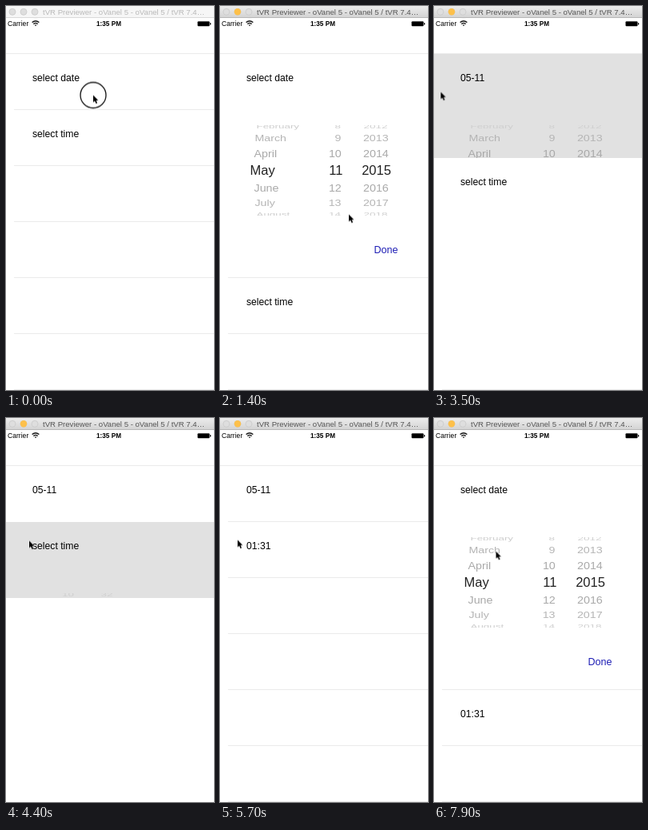
Recreate the animation shown at these times as an HTML page. Size 260 px wide and 480 px high, loop 8000 ms.

```html
<!DOCTYPE html>
<html lang="en">
<head>
<meta charset="utf-8">
<title>Expanding date and time cells</title>
<style>
html, body { margin: 0; width: 100%; height: 100%; overflow: hidden; background: #fff; }
body { font-family: "Liberation Sans", Arial, sans-serif; color: #111; }
#stage { position: relative; width: 260px; height: 480px; overflow: hidden; }
#stage > svg, .row > svg { position: absolute; left: 0; top: 0; }

#table { position: absolute; top: 60px; width: 260px; }
.row { position: relative; height: 70px; overflow: hidden; }
.row::after, #last {
  content: ""; position: absolute; left: 10px; right: 0; bottom: 0; height: 1px; background: #ebebeb;
}
.row::after { animation: seps 8s step-end infinite; }
#last { animation: last 8s step-end infinite; }
.row text { font-size: 12.2px; }
.row .done { font-size: 12.5px; fill: #1c1cb4; }
.row .rule { stroke: #eee; }

#date { animation: dateSize 8s ease-in-out infinite, dateGlow 8s linear infinite; }
#time { animation: timeSize 8s ease-in-out infinite, timeGlow 8s linear infinite; }
#dateAsk { animation: dateAsk 8s step-end infinite; }
#dateSet { animation: dateSet 8s step-end infinite; }
#timeAsk { animation: timeAsk 8s step-end infinite; }
#timeSet { animation: timeSet 8s step-end infinite; }
#dateRules { animation: rules 8s step-end infinite; }
.active { animation: active 8s step-end infinite; }
#cursor { animation: move 8s ease-in-out infinite; }
#ring { animation: press 8s step-end infinite; }

@keyframes dateSize {
  0%, 3.75% { height: 70px; }
  7.75%, 41.25% { height: 280px; }
  45.25%, 87.22% { height: 70px; }
  91.22%, 100% { height: 280px; }
}
@keyframes timeSize {
  0%, 54.06% { height: 70px; }
  58.06%, 67.25% { height: 280px; }
  71%, 100% { height: 70px; }
}
@keyframes dateGlow {
  0%, 11.25%, 48.75%, 95.6%, 100% { background: #fff; animation-timing-function: step-end; }
  2.5%, 41.25%, 86.9% { background: #e1e1e1; }
  8.75%, 46.25%, 91.9% { background: #e1e1e1; }
}
@keyframes timeGlow {
  0%, 62.5%, 71.25%, 100% { background: #fff; animation-timing-function: step-end; }
  53.75%, 66.9% { background: #e1e1e1; }
  58.75%, 70% { background: #e1e1e1; }
}
@keyframes seps {
  0%, 8.1%, 45.5%, 60%, 71.2%, 92%, 100% { visibility: visible; }
  3.75%, 41.25%, 53.9%, 67.25%, 86.9% { visibility: hidden; }
}
@keyframes last {
  0%, 60%, 100% { visibility: visible; }
  53.9% { visibility: hidden; }
}
@keyframes dateAsk {
  0%, 86.9%, 100% { visibility: visible; }
  41.25% { visibility: hidden; }
}
@keyframes dateSet {
  0%, 86.9%, 100% { visibility: hidden; }
  41.25% { visibility: visible; }
}
@keyframes timeAsk {
  0% { visibility: visible; }
  67.25%, 100% { visibility: hidden; }
}
@keyframes timeSet {
  0% { visibility: hidden; }
  67.25%, 100% { visibility: visible; }
}
@keyframes rules {
  0%, 45.25%, 100% { visibility: hidden; }
  36.25% { visibility: visible; }
}
@keyframes active {
  0% { visibility: hidden; }
  1.25%, 100% { visibility: visible; }
}
@keyframes press {
  0%, 38.1%, 52.5%, 66.4%, 85.6% { visibility: visible; }
  1.9%, 41.2%, 54%, 68%, 87%, 100% { visibility: hidden; }
}
@keyframes move {
  0%, 1.25% { transform: translate(109px, 111.5px); }
  11.25% { transform: translate(109px, 114px); }
  17.5% { transform: translate(161px, 260.5px); }
  22.5% { transform: translate(163px, 264px); }
  33.75% { transform: translate(70px, 152px); }
  38.75%, 41.25% { transform: translate(5.5px, 100.8px); }
  51.25% { transform: translate(28px, 152px); }
  55% { transform: translate(29px, 153.5px); }
  66.25%, 76.25% { transform: translate(22px, 152.5px); }
  80% { transform: translate(25px, 12px); }
  84.5%, 87.5% { transform: translate(25px, 123.5px); }
  97.5% { transform: translate(74px, 170px); }
  98.75%, 100% { transform: translate(77.5px, 166.7px); }
}
</style>
</head>
<body>
<div id="stage">
  <div id="table">
    <div class="row" id="date">
      <svg width="260" height="280">
        <text id="dateAsk" x="33" y="34">select date</text>
        <text id="dateSet" x="33" y="34">05-11</text>
        <path id="dateRules" class="rule" d="M10 133.5H260M10 157.5H260"/>
        <g class="wheel" clip-path="url(#window)"></g>
        <text class="done" x="192.5" y="249">Done</text>
      </svg>
    </div>
    <div class="row" id="time">
      <svg width="260" height="280">
        <text id="timeAsk" x="33" y="34">select time</text>
        <text id="timeSet" x="33" y="34">01:31</text>
        <path class="rule" d="M0 157.5H260"/>
        <g class="wheel" clip-path="url(#window)"></g>
        <text class="done" x="192.5" y="249">Done</text>
      </svg>
    </div>
    <div class="row"></div><div class="row"></div><div class="row"></div><div class="row"></div>
  </div>
  <div id="last"></div>

  <svg width="260" height="480">
    <defs>
      <linearGradient id="bar" x2="0" y2="1">
        <stop stop-color="#ececec"/><stop offset="1" stop-color="#d4d4d4"/>
      </linearGradient>
      <clipPath id="window"><rect y="89" width="260" height="113"/></clipPath>
    </defs>
    <path d="M0 59.5H260" stroke="#ebebeb"/>
    <g font-size="9.6">
      <rect width="260" height="14" fill="#f6f6f6"/>
      <path d="M0 14.5H260" stroke="#dadada"/>
      <text x="46" y="11" fill="#b9b9b9">tVR Previewer - oVanel 5 - oVanel 5 / tVR 7.4…</text>
      <g class="active">
        <rect width="260" height="14" fill="url(#bar)"/>
        <path d="M0 14.5H260" stroke="#b8b8b8"/>
        <text x="46" y="11" fill="#555">tVR Previewer - oVanel 5 - oVanel 5 / tVR 7.4…</text>
      </g>
      <g fill="#dedede" stroke="#c9c9c9" stroke-width=".8">
        <circle cx="8" cy="7.3" r="4"/><circle cx="22" cy="7.3" r="4"/><circle cx="36" cy="7.3" r="4"/>
      </g>
      <circle class="active" cx="22" cy="7.3" r="4.2" fill="#fdc04a"/>
    </g>
    <text x="2" y="25.2" font-size="8.6">Carrier</text>
    <text x="128.5" y="25.2" font-size="8.2" font-weight="bold" text-anchor="middle">1:35 PM</text>
    <g fill="none" stroke="#111" stroke-width="1.3">
      <path d="M32.6 20.6Q37 16.8 41.4 20.6M34.3 22.5Q37 20.2 39.7 22.5"/>
      <path d="M35.6 23.6H38.4L37 25.2Z" fill="#111" stroke="none"/>
    </g>
    <rect x="239.5" y="19.3" width="15" height="6" rx="1" fill="#000"/>
    <rect x="255" y="21.2" width="1.2" height="2.2" fill="#000"/>
    <g id="cursor">
      <circle id="ring" r="16" fill="none" stroke="#111" stroke-width="1.3"/>
      <path d="M0 0V9L2 7.1 3.5 10.6 5.1 9.9 3.7 6.5H6.4Z" fill="#000" stroke="#fff" stroke-width=".8" paint-order="stroke"/>
    </g>
  </svg>
</div>
<script>
const NS = "http://www.w3.org/2000/svg";
// Wheel slots from top to bottom: centre, type size, vertical squash, colour.
const slots = [
  [90.5, 13.4, 0.55, "#cfcfcf"],
  [105, 14.2, 0.75, "#b4b4b4"],
  [124, 14.3, 0.95, "#a9a9a9"],
  [145.5, 16.5, 1, "#222"],
  [167.5, 14.3, 0.95, "#a9a9a9"],
  [186, 14.2, 0.75, "#b4b4b4"],
  [200.5, 13.4, 0.55, "#cfcfcf"]
];
const bend = [8, 6, 5, 0, 5, 6, 8];

function column(wheel, values, anchor, xAt) {
  values.forEach((value, i) => {
    if (!value) return;
    const [y, size, squash, fill] = slots[i];
    const text = document.createElementNS(NS, "text");
    text.textContent = value;
    text.setAttribute("transform", `translate(${xAt(i)} ${y}) scale(1 ${squash})`);
    text.setAttribute("y", size * 0.36);
    text.setAttribute("text-anchor", anchor);
    text.style.fontSize = size + "px";
    text.style.fill = fill;
    wheel.append(text);
  });
}

const count = first => slots.map((_, i) => String(first + i));
const [dateWheel, timeWheel] = document.querySelectorAll(".wheel");

const months = ["February", "March", "April", "May", "June", "July", "August"];
column(dateWheel, months, "start", i => 37.5 + bend[i]);
column(dateWheel, count(8), "end", i => 153.5 - bend[i] / 3);
column(dateWheel, count(2012), "middle", i => 195.5 - bend[i] / 8);

const hours = slots.map((_, i) => String((i + 9) % 12 + 1));
column(timeWheel, hours, "end", () => 85);
column(timeWheel, count(32), "middle", () => 126);
column(timeWheel, ["", "", "AM", "PM"], "middle", () => 168.3);
</script>
</body>
</html>
```
